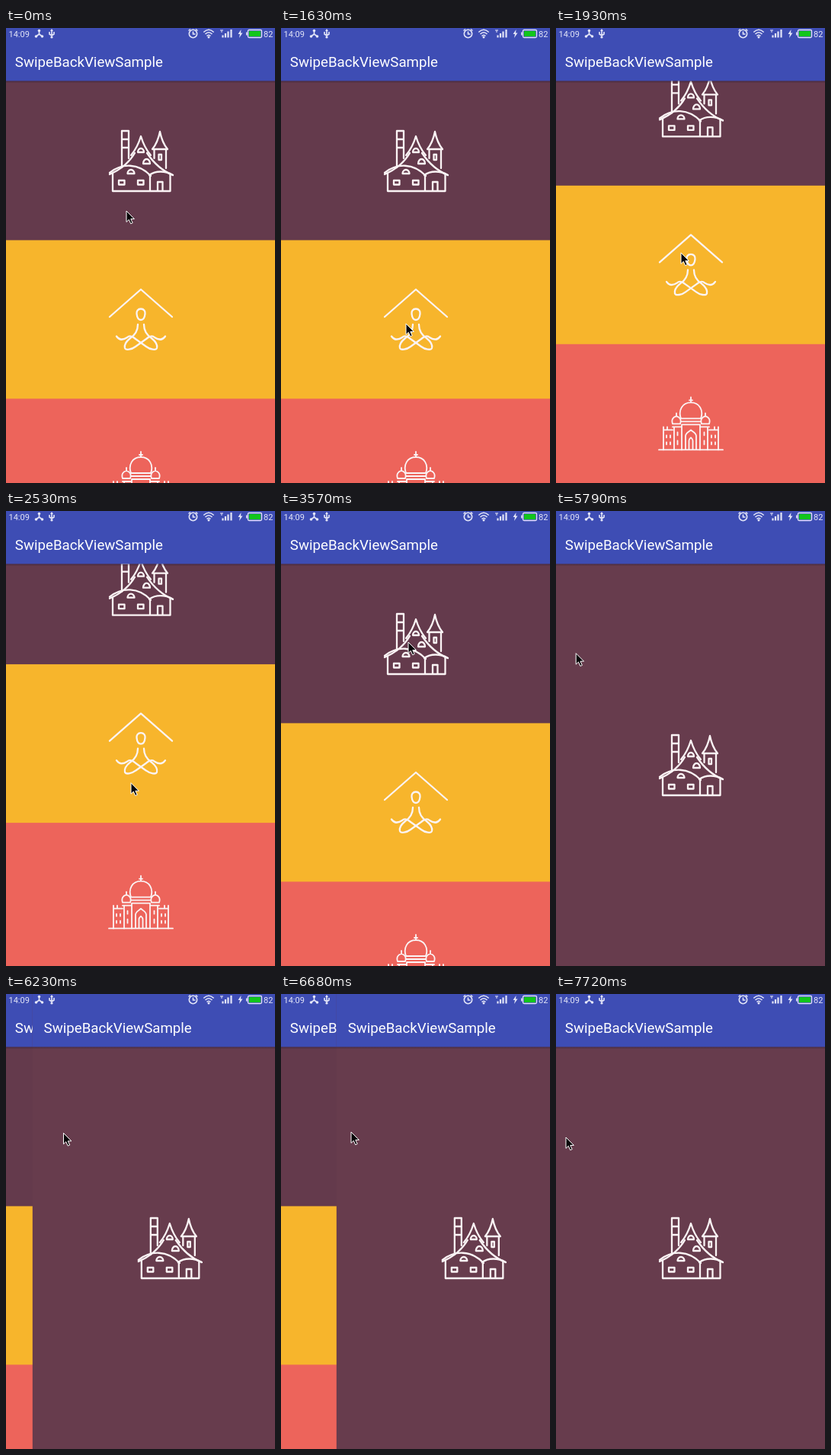
Animation, 353 px wide and 597 px high, one loop 8 s. Source, as an HTML page:

```html
<!DOCTYPE html>
<html lang="en">
<head>
<meta charset="utf-8">
<title>SwipeBackViewSample</title>
<style>
html, body { margin: 0; width: 100%; height: 100%; overflow: hidden; background: #673c4d; }
svg { display: block; width: 100%; height: 100%; }
text { font-family: Roboto, "Open Sans", sans-serif; fill: #fff; }
.title { font-size: 18.7px; }
.small { font-size: 11px; fill: #e4e6f8; }
.icon { fill: none; stroke: #fbf4f5; stroke-width: 2.3; stroke-linejoin: round; stroke-linecap: round; }
.fine { stroke-width: 1.8; }
.status { fill: none; stroke: #e4e6f8; stroke-width: 1.6; }
.status .solid { fill: #e4e6f8; stroke: none; }
</style>
</head>
<body>
<svg viewBox="0 0 353 597" preserveAspectRatio="none">
  <defs>
    <linearGradient id="shade" x2="0" y2="1">
      <stop offset="0" stop-color="#221428" stop-opacity=".4"/>
      <stop offset="1" stop-color="#221428" stop-opacity="0"/>
    </linearGradient>

    <g id="bar">
      <rect width="360" height="69.500" fill="#3e4db4"/>
      <rect y="69.500" width="360" height="3" fill="url(#shade)"/>
    </g>
    <text id="title" class="title" x="11.800" y="51">SwipeBackViewSample</text>

    <g id="house" class="icon">
      <path d="M152 183V135H161V171M152 146H161M152 157H161"/>
      <path d="M164 167C170 160 174 152 177 142C180 152 184 160 190 167M173 163A4 5 0 0 1 181 163Z"/>
      <path d="M192 159C197 153 200 146 202 136C204 146 207 153 212 159ZM194.500 159V171M210 159V184M200.500 166H204V173H200.500Z"/>
      <path d="M136 192C150 186 162 176 169 164M185 164C193 176 204 187 219 193M180 178A4.500 6 0 0 1 189 178Z"/>
      <path d="M136 190C152 177 174 177 190 194M159.500 191A4.500 5 0 0 1 168.500 191ZM188 193C196 187 209 187 219 193"/>
      <path d="M140 191V214H215.500V192M189 193V214M148 200H155.500V205.500H148ZM173 200H180.500V205.500H173ZM199 214V202H205.500V214"/>
    </g>

    <path id="limb" d="M173 389C173 398 169 403 163 407C158 411 155 416 156 420C157 423 165 422 170 418L184 408C189 404 192 403 195 406C201 410 206 409 209 404.500"/>
    <g id="yoga" class="icon">
      <path d="M136 379L177 343L218 379"/>
      <path d="M177 368.500C181 368.500 183 371.500 182.500 375C182 380 180 383 177 383C174 383 172 380 171.500 375C171 371.500 173 368.500 177 368.500Z"/>
      <use href="#limb"/>
      <use href="#limb" transform="matrix(-1 0 0 1 354 0)"/>
    </g>

    <g id="wing">
      <path d="M153 591C151 585 154 582 158 581C162 582 165 585 163 591ZM158 577V581M153 595H164M155 595V625"/>
      <path d="M141 625V599H153M141 595V599M146 595V599M145 606V609M150 606V609M145 615V618M150 615V618M159.500 602V606M159.500 613V618"/>
    </g>
    <g id="palace" class="icon fine">
      <path d="M177 556V563M175 560H179M164 584C160 573 166 563 177 563C188 563 194 573 190 584ZM164 588H190M165 625V592H189V625"/>
      <path d="M170 625V607C170 603 174 602 177 599C180 602 184 603 184 607V625M174.500 625V613C174.500 611 176 610 177 609C178 610 179.500 611 179.500 613V625M135 625H219"/>
      <use href="#wing"/>
      <use href="#wing" transform="matrix(-1 0 0 1 354 0)"/>
    </g>
  </defs>

  <g id="list">
    <rect y="60" width="353" height="219" fill="#643a4c"/>
    <rect y="278.400" width="353" height="209" fill="#f7b52c"/>
    <rect y="486.400" width="353" height="208" fill="#ed645b"/>
    <use href="#house"/>
    <use href="#yoga"/>
    <use href="#palace"/>
  </g>
  <use href="#bar"/>
  <use href="#title"/>

  <g id="page">
    <rect x="-3" width="360" height="597" fill="#673c4d"/>
    <use href="#bar" x="-3"/>
    <use href="#title"/>
    <use href="#house" y="159"/>
  </g>

  <g class="status">
    <g stroke="none">
      <text class="small" x="3.500" y="12">14:09</text>
      <text class="small" x="338" y="12">82</text>
    </g>
    <path d="M43.500 4V8L39.500 11M43.500 8L47.500 11"/>
    <g class="solid">
      <circle cx="43.500" cy="3.500" r="1.800"/>
      <circle cx="39.500" cy="11" r="1.800"/>
      <circle cx="47.500" cy="11" r="1.800"/>
      <circle cx="60" cy="12" r="1.600"/>
      <path d="M58 4L60 1L62 4Z"/>
    </g>
    <path d="M60 3V12M57 5V8L60 10L63 8V5"/>
    <circle cx="245.500" cy="7.500" r="5.200"/>
    <path d="M245.500 4.500V8H248.500M239.500 3.500L242 1.500M251.500 3.500L249 1.500"/>
    <path d="M259.300 5.500Q266 -1 272.700 5.500M261.500 8Q266 3.500 270.500 8M263.500 10.500Q266 8 268.500 10.500"/>
    <circle class="solid" cx="266" cy="12" r="1.500"/>
    <path d="M284.500 12.500V9.500M288 12.500V7M291.500 12.500V4.500M295.500 12.500V2" stroke-width="2.200"/>
    <path d="M281 3H285M283 3V6" stroke-width="1"/>
    <path class="solid" d="M308.500 2L304.500 8H307L306 13L310.500 6.500H308Z"/>
    <rect x="317.500" y="2.500" width="18" height="10" rx="1.500" stroke-width="1.300"/>
    <rect x="319" y="4" width="15" height="7" fill="#12c51c" stroke="none"/>
    <path d="M315.800 5.500V9.500"/>
  </g>

  <path id="cursor" d="M0 0V14.500L3.300 11.400L5.700 16.800L8.200 15.700L5.800 10.500H10.400Z" fill="#070507" stroke="#fff"/>
</svg>

<script>
const LOOP = 8000, STEP = 148.4, WIDTH = 360, MAX_SCROLL = 97, PULL = 76;
const [list, page, cursor] = ["list", "page", "cursor"].map(id => document.getElementById(id));

const line = (t, from, to) => Math.min(1, Math.max(0, (t - from) / (to - from)));
const smooth = (...span) => { const p = line(...span); return p * p * (3 - 2 * p); };
const out = (...span) => 1 - (1 - line(...span)) ** 2;

const scrollAt = t => MAX_SCROLL * (smooth(t, 1630, 2080) - smooth(t, 2375, 2885));

function slideAt(t) {
  const open = WIDTH * (1 - line(t, 3862, 4296)) ** 3;
  const pull = PULL * line(t, 5790, 6680) * (1 - smooth(t, 6680, 6940));
  return open + pull;
}

function pointerAt(t) {
  const reach = smooth(t, 592, 1038);
  const dragUp = out(t, 1484, 2080), dragDown = smooth(t, 2169, 2980);
  const toItem = smooth(t, 3120, 3560);
  const toEdge = smooth(t, 4450, 5040);
  const swipe = out(t, 5690, 6680);
  const back = smooth(t, 7130, 7715);
  return [
    158 + 6 * reach + 3 * toItem - 156 * toEdge + 81 * swipe - 79 * back,
    240 + 229 * reach - 186 * dragUp + 182 * dragDown - 293 * toItem + 16 * toEdge - 7 * swipe + 7 * back
  ];
}

const move = (el, x, y) => el.setAttribute("transform", `translate(${x} ${y})`);

function draw(ms) {
  // The screen refreshes in even, discrete steps.
  const t = Math.floor((ms % LOOP) / STEP + 0.06) * STEP;
  move(list, 0, -scrollAt(t));
  move(page, slideAt(t), 0);
  move(cursor, ...pointerAt(t));
}

const start = performance.now();
function tick() {
  draw(performance.now() - start);
  requestAnimationFrame(tick);
}
tick();
</script>
</body>
</html>
```
